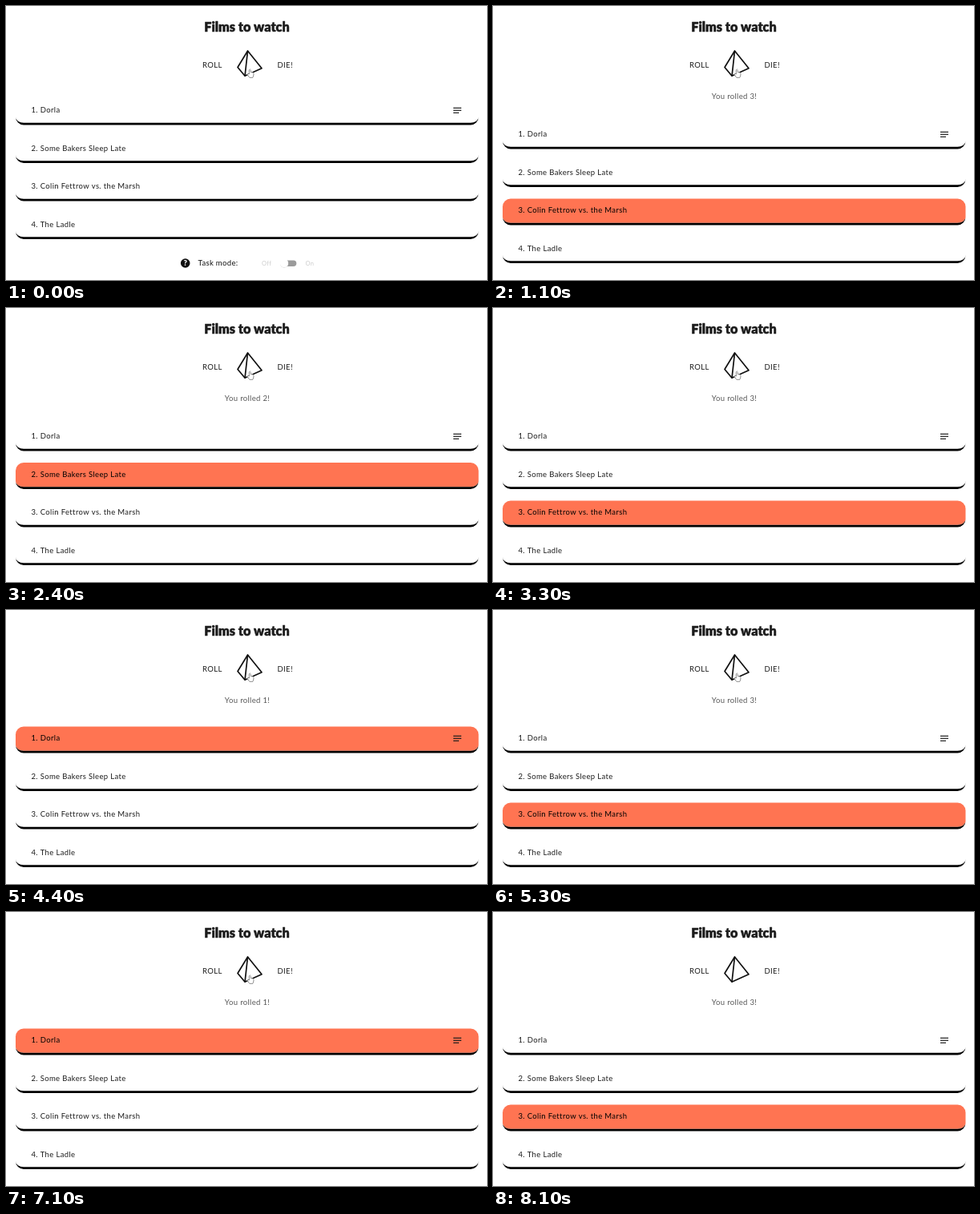
An HTML page with a canvas that plays this animation: 600 by 342 pixels, repeating every 8400 ms.

```html
<!DOCTYPE html>
<html lang="en">
<head>
<meta charset="utf-8">
<title>Films to watch</title>
<style>
html, body { margin: 0; width: 100%; height: 100%; overflow: hidden; background: #fff; }
canvas { display: block; width: 600px; height: 342px; }
</style>
</head>
<body>
<canvas id="stage"></canvas>
<script>
const LOOP = 8400;
const POINTER_HIDDEN = 7500;
const INK = '#1c1c1c';
const FILMS = ['Dorla', 'Some Bakers Sleep Late', 'Colin Fettrow vs. the Marsh', 'The Ladle'];
const ROLLS = [[0, 0], [100, 3], [1500, 1], [2400, 2], [3300, 3], [4400, 1], [5200, 3], [5900, 1], [7500, 3]];
const ROW = { x: 12, width: 577.5, height: 33, step: 47.5, radius: 10, border: 2.7 };

const canvas = document.getElementById('stage');
const ctx = canvas.getContext('2d');
const ratio = window.devicePixelRatio || 1;
canvas.width = 600 * ratio;
canvas.height = 342 * ratio;
ctx.scale(ratio, ratio);

function text(str, x, y, { size = 9.5, weight = 400, color = INK, align = 'left', spacing = 0.35 } = {}) {
  ctx.font = `${weight} ${size}px Lato, sans-serif`;
  ctx.letterSpacing = spacing + 'px';
  ctx.textAlign = align;
  ctx.fillStyle = color;
  ctx.fillText(str, x, y);
}

function polyline(points, close) {
  ctx.beginPath();
  for (const [x, y] of points) ctx.lineTo(x, y);
  if (close) ctx.closePath();
  ctx.stroke();
}

function disc(x, y, r, color) {
  ctx.fillStyle = color;
  ctx.beginPath();
  ctx.arc(x, y, r, 0, Math.PI * 2);
  ctx.fill();
}

function drawTitle() {
  text('Films to watch', 300.5, 32, { size: 16.2, weight: 900, align: 'center', spacing: 0 });
  ctx.strokeStyle = INK;
  ctx.lineWidth = 0.5;
  ctx.strokeText('Films to watch', 300.5, 32);
}

function drawDie() {
  text('ROLL', 245, 76.5);
  text('DIE!', 338.5, 76.5);
  const apex = [301.5, 56], base = [298, 87.3];
  ctx.strokeStyle = '#111';
  ctx.lineWidth = 1.7;
  ctx.lineJoin = 'round';
  polyline([apex, [289, 76.5], base, [319, 77.8]], true);
  polyline([apex, base]);
}

function drawPointer() {
  ctx.beginPath();
  ctx.moveTo(303.3, 85);
  ctx.lineTo(303.3, 79.8);
  ctx.quadraticCurveTo(304.3, 78, 305.2, 79.8);
  ctx.lineTo(305.2, 82.6);
  ctx.quadraticCurveTo(309, 82.4, 309, 84.6);
  ctx.quadraticCurveTo(309, 87, 307.8, 89.4);
  ctx.lineTo(303.8, 89.4);
  ctx.lineTo(301, 85.4);
  ctx.quadraticCurveTo(301.4, 83.8, 303.3, 85);
  ctx.closePath();
  ctx.fillStyle = '#fff';
  ctx.fill();
  ctx.strokeStyle = '#777';
  ctx.lineWidth = 0.8;
  ctx.stroke();
}

function drawRow(index, top, active) {
  const { x, width, height, radius: r, border } = ROW;
  const inner = { x: r, y: r - border };
  const y = top + index * ROW.step;
  if (active) {
    ctx.fillStyle = '#ff7452';
    ctx.beginPath();
    ctx.roundRect(x, y, width, height - border, [r, r, inner, inner]);
    ctx.fill();
  }
  // Bottom border tapering into the rounded corners
  ctx.fillStyle = '#000';
  ctx.beginPath();
  ctx.roundRect(x, y + height - r, width, r, [0, 0, r, r]);
  ctx.roundRect(x, y + height - r, width, r - border, [0, 0, inner, inner]);
  ctx.fill('evenodd');
  text(`${index + 1}. ${FILMS[index]}`, 31.5, y + 17.7, { color: active ? '#000' : INK });
}

function drawMenu(y) {
  ctx.strokeStyle = INK;
  ctx.lineWidth = 1.2;
  [10, 10, 7].forEach((w, i) => polyline([[558, y + i * 3], [558 + w, y + i * 3]]));
}

function drawFooter() {
  disc(223.7, 321, 5.8, '#111');
  text('?', 223.8, 324.4, { size: 9.5, weight: 900, color: '#fff', align: 'center', spacing: 0 });
  text('Task mode:', 239.5, 323.8, { color: '#111' });
  text('Off', 319, 323.8, { size: 7.5, color: '#ccc' });
  text('On', 373.5, 323.8, { size: 7.5, color: '#ccc' });
  ctx.fillStyle = '#9b9b9b';
  ctx.beginPath();
  ctx.roundRect(344.5, 317.6, 17.8, 7.4, 3.7);
  ctx.fill();
  disc(347, 321.7, 5, '#d8d8d8');
  disc(347, 321, 5.2, '#fff');
}

function draw(time) {
  const roll = ROLLS.findLast(([start]) => start <= time)[1];
  const top = roll ? 145.5 : 115.5;
  ctx.fillStyle = '#fff';
  ctx.fillRect(0, 0, 600, 342);
  drawTitle();
  drawDie();
  if (time < POINTER_HIDDEN) drawPointer();
  if (roll) text(`You rolled ${roll}!`, 301, 115.7, { color: '#555', align: 'center' });
  FILMS.forEach((_, i) => drawRow(i, top, i + 1 === roll));
  drawMenu(top + 11.8);
  if (!roll) drawFooter();
}

const begin = performance.now();
function tick() {
  draw((performance.now() - begin) % LOOP);
  requestAnimationFrame(tick);
}
tick();
</script>
</body>
</html>
```
